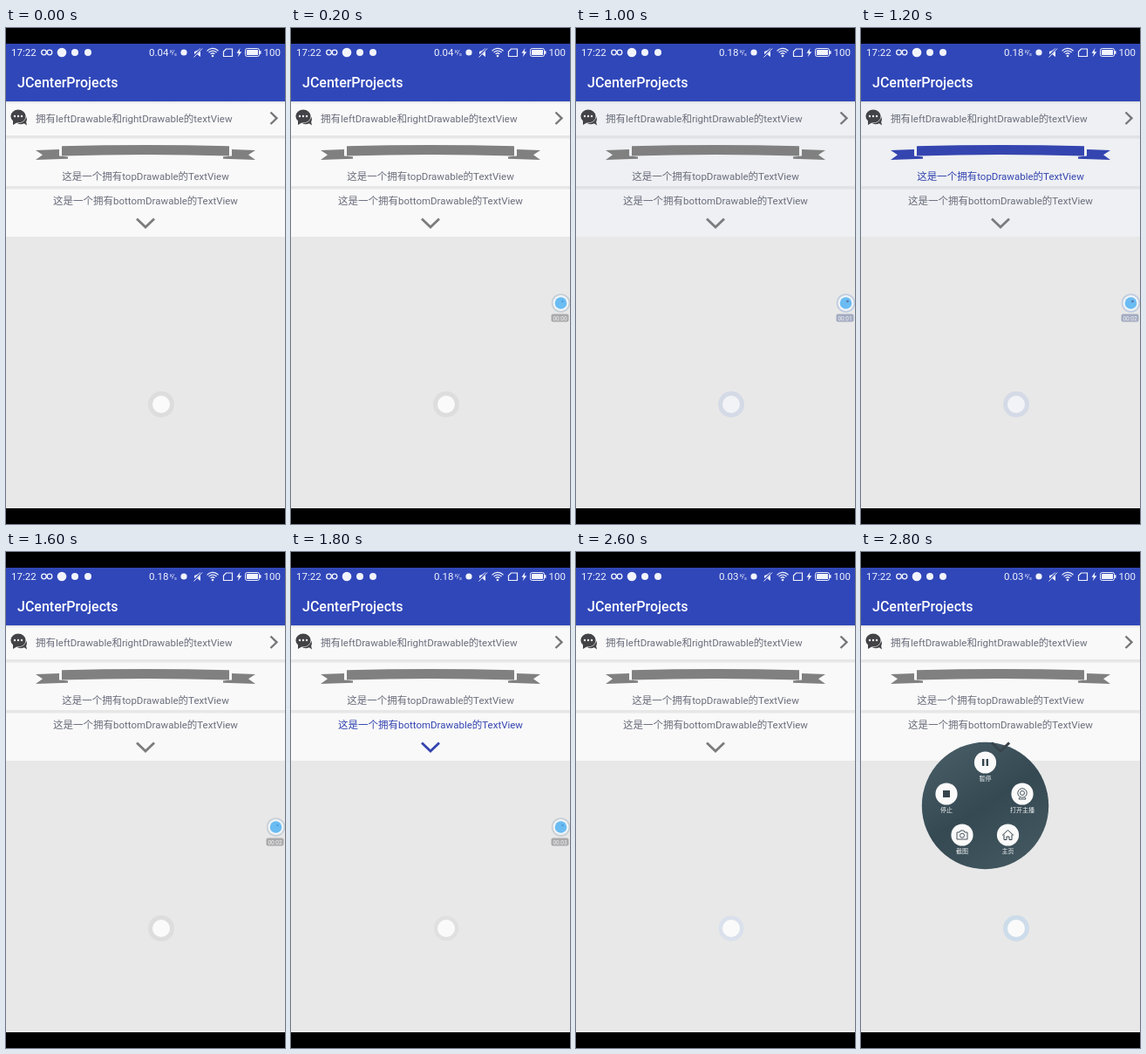
Animation, 320 px wide and 568 px high, one loop 3000 ms. Source, as an HTML page with a canvas:

```html
<!DOCTYPE html>
<html lang="zh">
<head>
<meta charset="utf-8">
<title>JCenterProjects</title>
<style>
html, body { margin: 0; width: 100%; height: 100%; overflow: hidden; background: #000; }
canvas { display: block; width: 320px; height: 568px; }
</style>
</head>
<body>
<canvas id="stage"></canvas>
<script>
const W = 320, H = 568, LOOP = 3000, STEP = 200;
const SANS = 'Roboto, "Noto Sans CJK SC", "Noto Sans CJK", sans-serif';
const canvas = document.getElementById('stage');
const ctx = canvas.getContext('2d');
const ratio = window.devicePixelRatio || 1;
canvas.width = W * ratio;
canvas.height = H * ratio;
ctx.scale(ratio, ratio);

function rect(x, y, w, h, fill) {
  ctx.fillStyle = fill;
  ctx.fillRect(x, y, w, h);
}

function roundBox(x, y, w, h, r) {
  ctx.beginPath();
  ctx.roundRect(x, y, w, h, r);
}

function disc(x, y, r, fill) {
  ctx.fillStyle = fill;
  ctx.beginPath();
  ctx.arc(x, y, r, 0, 7);
  ctx.fill();
}

function ring(x, y, r, stroke, width) {
  ctx.strokeStyle = stroke;
  ctx.lineWidth = width;
  ctx.beginPath();
  ctx.arc(x, y, r, 0, 7);
  ctx.stroke();
}

function trace(points) {
  ctx.beginPath();
  points.forEach(([x, y], i) => i ? ctx.lineTo(x, y) : ctx.moveTo(x, y));
}

function poly(points, fill) {
  trace(points);
  ctx.closePath();
  ctx.fillStyle = fill;
  ctx.fill();
}

function line(points, stroke, width) {
  trace(points);
  ctx.strokeStyle = stroke;
  ctx.lineWidth = width;
  ctx.stroke();
}

function text(str, x, y, size, fill, weight = 400, align = 'left') {
  ctx.font = `${weight} ${size}px ${SANS}`;
  ctx.textAlign = align;
  ctx.fillStyle = fill;
  ctx.fillText(str, x, y);
}

function statusBar(speed) {
  const ink = '#f2f4fc';
  text('17:22', 6, 32, 11.5, ink);
  ring(43.5, 28, 2.8, ink, 1.3);
  ring(50, 28, 2.8, ink, 1.3);
  disc(64, 28, 5.3, ink);
  disc(79, 28, 4, ink);
  disc(94, 28, 4, ink);
  text(speed, 164, 32, 11.5, ink);
  text('K', 188, 28.5, 5.5, ink);
  line([[190.5, 31], [193, 25]], ink, 0.6);
  text('s', 193, 32, 5.5, ink);
  disc(204, 28, 3.6, ink);

  // muted bell
  poly([[216, 27], [219, 26], [223, 23], [223, 33], [219, 30], [216, 30]], ink);
  line([[215, 33], [225, 23]], '#3047b9', 2.4);
  line([[215.5, 33.5], [225, 23.5]], ink, 1);

  // wifi
  ctx.strokeStyle = ink;
  ctx.lineWidth = 1.2;
  for (const r of [3.2, 5.9, 8.6]) {
    ctx.beginPath();
    ctx.arc(237, 32, r, -Math.PI * 0.77, -Math.PI * 0.23);
    ctx.stroke();
  }
  disc(237, 32, 1.3, ink);

  line([[249.5, 32.5], [249.5, 27], [252.5, 24], [259.5, 24], [259.5, 32.5], [249, 32.5]], ink, 1.2);
  poly([[268.5, 23], [264.5, 28.7], [267, 28.7], [265.8, 33.3], [270.3, 27.3], [267.7, 27.3]], ink);
  ctx.strokeStyle = ink;
  ctx.lineWidth = 1;
  roundBox(274.5, 23.5, 16, 9, 2);
  ctx.stroke();
  rect(276, 25, 13, 6, ink);
  rect(291, 26.2, 1.5, 3.6, ink);
  text('100', 295.5, 32, 11.5, ink);
}

function header(speed) {
  rect(0, 18, W, 66, '#3047b9');
  statusBar(speed);
  text('JCenterProjects', 13, 68, 16, '#fff', 500);
  const shade = ctx.createLinearGradient(0, 83, 0, 87);
  shade.addColorStop(0, '#c3c5cc');
  shade.addColorStop(1, 'rgba(225,226,230,0)');
  rect(0, 84, W, 3, shade);
}

function chatIcon(ink, back) {
  ctx.fillStyle = ink;
  ctx.beginPath();
  ctx.ellipse(17, 104.5, 7, 5.8, 0, 0, 7);
  ctx.fill();
  poly([[19, 108], [24, 111.5], [22.5, 105]], ink);
  ctx.beginPath();
  ctx.ellipse(14, 101, 8.6, 7.4, 0, 0, 7);
  ctx.strokeStyle = back;
  ctx.lineWidth = 1.2;
  ctx.stroke();
  ctx.fillStyle = ink;
  ctx.fill();
  poly([[8, 105], [8, 111], [14, 107.5]], ink);
  for (const x of [10, 14, 18]) disc(x, 101, 1.2, back);
}

function ribbon(fill) {
  const tail = [[34, 140], [61, 139], [61, 146.5], [71, 147.5], [71, 149.8], [34, 151], [42, 145.3]];
  poly(tail, fill);
  poly(tail.map(([x, y]) => [W - x, y]), fill);
  ctx.beginPath();
  ctx.moveTo(64, 135.3);
  ctx.quadraticCurveTo(160, 132.7, 256, 135.3);
  ctx.lineTo(256, 146.5);
  ctx.quadraticCurveTo(160, 143.5, 64, 146.5);
  ctx.fill();
}

function rows(pressed, tinted) {
  const back = tinted ? '#eef0f3' : '#f9f9f9';
  const active = '#3445b0';
  const tone = (row, idle) => pressed === row ? active : idle;
  const label = row => tone(row, '#6b6e7c');
  const gap = tinted ? '#e0e2e5' : '#e7e7e7';

  rect(0, 84, W, 155, back);
  rect(0, 123, W, 3.5, gap);
  rect(0, 181, W, 3.5, gap);

  chatIcon(tone(1, '#434347'), back);
  text('拥有leftDrawable和rightDrawable的textView', 34, 108, 11.5, label(1));
  line([[303.5, 96.5], [310.5, 103.3], [303.5, 110]], tone(1, '#77777a'), 2.4);

  ribbon(tone(2, '#808080'));
  text('这是一个拥有topDrawable的TextView', 160, 173.5, 11.5, label(2), 400, 'center');

  text('这是一个拥有bottomDrawable的TextView', 160, 201.5, 11.5, label(3), 400, 'center');
  line([[150, 218.5], [160, 228], [170, 218.5]], tone(3, '#7c7c7e'), 2.8);
}

function touchDot(t, tinted) {
  let color = '#dddddd', r = 15;
  if (tinted) color = '#d4dae6';
  if (t >= 1800 && t < 2000) [color, r] = ['#e0e0e0', 14.3];
  if (t >= 2600) [color, r] = ['#dae1ec', 14.5];
  if (t >= 2800) [color, r] = ['#cddcea', 15];
  disc(178, 431, r, color);
  disc(178, 431, 10, tinted ? '#f2f3f6' : '#fafafa');
}

function recorder(t, tinted) {
  const seconds = t < 600 ? 0 : Math.min(4, Math.floor(t / 600) + (t >= 2200 ? 1 : 0));
  disc(309.5, 315, 10.8, tinted ? '#c3cde0' : '#c9d0d6');
  disc(309.5, 315, 9, '#f1f5f8');
  disc(309.5, 315, 6.8, '#6abcf2');
  disc(311.5, 313, 1.3, tinted ? '#5c6fa8' : '#4f9fe0');
  ctx.fillStyle = tinted ? '#a3abc2' : '#aaaaac';
  roundBox(298.5, 327.5, 20, 9, 2);
  ctx.fill();
  text('00:0' + seconds, 308.5, 334.5, 6.5, '#f4f4f4', 400, 'center');
}

const buttons = [
  ['暂停', 142.5, 241, (x, y) => {
    rect(x - 3.5, y - 4, 2.4, 8, INK);
    rect(x + 1.1, y - 4, 2.4, 8, INK);
  }],
  ['停止', 98, 277, (x, y) => rect(x - 4, y - 4, 8, 8, INK)],
  ['打开主播', 185, 277, (x, y) => {
    ring(x, y - 1, 5.2, INK, 0.9);
    ring(x, y - 1, 2.5, INK, 0.9);
    line([[x - 3, y + 4], [x - 4, y + 6], [x + 4, y + 6], [x + 3, y + 4]], INK, 0.9);
  }],
  ['截图', 116, 324, (x, y) => {
    line([[x - 6, y - 3], [x - 3, y - 3], [x - 2, y - 5], [x + 2, y - 5], [x + 3, y - 3],
      [x + 6, y - 3], [x + 6, y + 5], [x - 6, y + 5], [x - 6, y - 3]], INK, 0.9);
    ring(x, y + 0.7, 2.5, INK, 0.9);
  }],
  ['主页', 168.5, 324, (x, y) => {
    line([[x - 6.5, y + 0.5], [x, y - 5.5], [x + 6.5, y + 0.5]], INK, 1);
    line([[x - 4.5, y - 0.5], [x - 4.5, y + 5.5], [x - 1.5, y + 5.5], [x - 1.5, y + 2],
      [x + 1.5, y + 2], [x + 1.5, y + 5.5], [x + 4.5, y + 5.5], [x + 4.5, y - 0.5]], INK, 1);
  }]
];
const INK = '#36454d';

function menu() {
  const fill = ctx.createLinearGradient(100, 225, 185, 355);
  fill.addColorStop(0, '#465b64');
  fill.addColorStop(0.5, '#354953');
  fill.addColorStop(1, '#42575f');
  disc(142.5, 290.5, 72.7, fill);
  line([[150, 218.5], [160, 228], [170, 218.5]], '#38434a', 2.8);
  for (const [label, x, y, icon] of buttons) {
    disc(x, y, 12.6, '#fafafa');
    icon(x, y);
    text(label, x, y + 20.7, 7, '#f4f6f7', 400, 'center');
  }
}

function pressedRow(t) {
  if (t >= 800 && t < 1000) return 1;
  if (t >= 1200 && t < 1400) return 2;
  if (t >= 1800 && t < 2000) return 3;
  return 0;
}

function draw(now) {
  const t = Math.floor((now % LOOP) / STEP) * STEP;
  const tinted = t >= 800 && t < 1400;
  const speed = t < 400 ? '0.04' : t < 2000 ? '0.18' : '0.03';
  rect(0, 0, W, H, '#000');
  rect(0, 239, W, 311, '#e8e8e8');
  rows(pressedRow(t), tinted);
  header(speed);
  touchDot(t, tinted);
  if (t >= 200 && t < 2600) recorder(t, tinted);
  if (t >= 2800) menu();
}

const start = performance.now();
function tick() {
  draw(performance.now() - start);
  requestAnimationFrame(tick);
}
tick();
</script>
</body>
</html>
```
